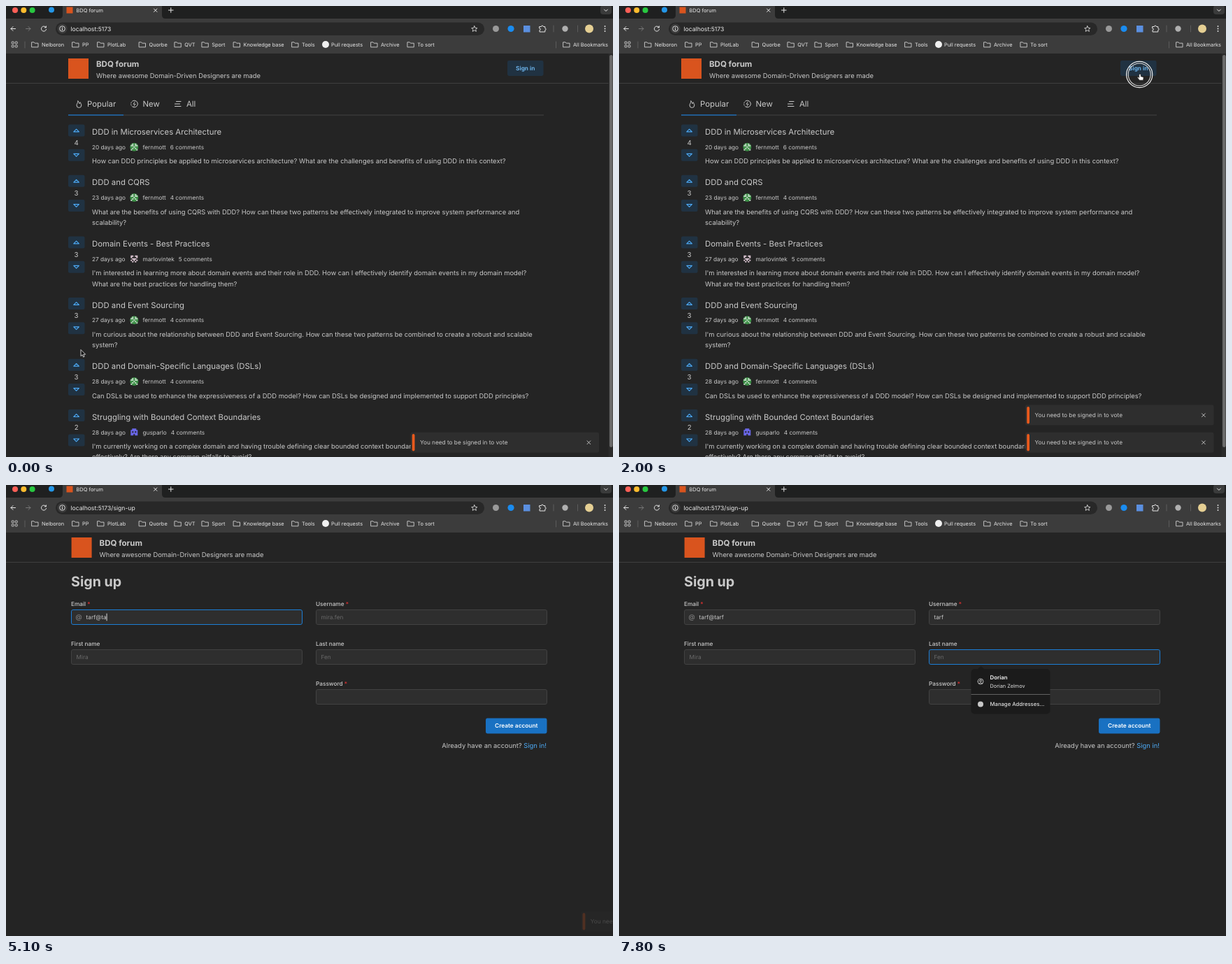
Animation of 868x645 px, one loop 8000 ms. Source, as an HTML page:

```html
<!DOCTYPE html>
<html lang="en">
<head>
<meta charset="utf-8">
<title>Forum sign-up</title>
<style>
html, body { margin: 0; width: 100%; height: 100%; overflow: hidden; background: #242424; }
svg { display: block; width: 100vw; height: 100vh; font-family: Inter, "Noto Sans", sans-serif; }
text { white-space: pre; text-rendering: geometricPrecision; }
</style>
</head>
<body>
<svg id="stage" viewBox="0 0 868 645"></svg>
<script>
const LOOP = 8000, STEP = 100;
const TEXT = '#c9c9c9', BLUE = '#4dabf7', DIM = '#696969', BAR = '#e6e6e6', PAGE = '#242424';
const BODY = 9.4, SMALL = 8.26, CHROME = 7.4;

// Markup helpers; text is placed by the middle of its capitals.
const text = (x, y, s, size = BODY, fill = TEXT, more = '') =>
  `<text x="${x}" y="${(y + size * 0.355).toFixed(2)}" font-size="${size}" fill="${fill}" ${more}>${s}</text>`;
const rect = (x, y, w, h, fill, r = 0, more = '') =>
  `<rect x="${x}" y="${y}" width="${w}" height="${h}" rx="${r}" fill="${fill}" ${more}/>`;
const dot = (x, y, r, fill, more = '') => `<circle cx="${x}" cy="${y}" r="${r}" fill="${fill}" ${more}/>`;
const line = (d, stroke = BAR, w = 1, more = '') =>
  `<path d="${d}" fill="none" stroke="${stroke}" stroke-width="${w}" stroke-linecap="round" stroke-linejoin="round" ${more}/>`;
const group = (id, body, more = '') => `<g id="${id}" ${more}>${body}</g>`;
const bold = w => `font-weight="${w}" `;
const mid = 'text-anchor="middle"';

function folder(x, label) {
  return line(`M${x} 51.8h3l1.2 1.4h4.8v5.6h-9z`, '#d0d0d0', 0.9) + text(x + 14, 55, label, CHROME, BAR);
}

function browser() {
  const lights = ['#fe5f57', '#febc2e', '#28c840'].map((c, i) => dot(13 + i * 12.3, 6, 4, c)).join('');
  const marks = [[37, 'Nelboron'], [95, 'PP'], [131, 'PlotLab'], [190.5, 'Quorbe'], [241.3, 'QVT'], [280.3, 'Sport'],
    [325.5, 'Knowledge base'], [409, 'Tools'], [522, 'Archive'], [574.3, 'To sort'], [797, 'All Bookmarks']];
  const apps = [0, 1, 2, 3].map(i =>
    rect(8.2 + (i % 2) * 5, 51 + (i >> 1) * 5, 3, 3, 'none', 0.5, 'stroke="#d0d0d0" stroke-width=".9"')).join('');
  return rect(0, 0, 868, 18, '#1f2020') + rect(0, 18, 868, 50, '#3c3c3c') +
    '<path d="M76 18q5 0 5-5V0H223v13q0 5 5 5z" fill="#3c3c3c"/>' + lights +
    dot(65, 5.5, 4, '#2497e8') + rect(86.5, 1.5, 9, 9, '#d9541e') +
    text(100.5, 6, 'BDQ forum', CHROME, BAR) +
    line('M211.5 4l4.4 4.4m0-4.4l-4.4 4.4M232.5 6h6.6m-3.3-3.3v6.6') +
    rect(850, -1, 16, 13, '#3a3b3b', 4) + line('M855.5 5l2.4 2.4l2.4-2.4') +
    line('M13.5 32.5H7m3-3l-3 3l3 3') + line('M28.5 32.5H35m-3-3l3 3l-3 3', '#777') +
    line('M57 30.4a3.6 3.6 0 1 0 .6 3M57.4 28.8v2h-2') +
    rect(71, 23.5, 613, 18.5, '#282828', 9.2) + dot(80.5, 32.5, 7, '#3c3c3c') +
    dot(80.5, 32.5, 3.8, 'none', `stroke="${BAR}" stroke-width=".9"`) + line('M80.5 32v2.4M80.5 30.5v.1') +
    text(92.5, 32.5, '', 8.6, '#ececec', 'id="url"') +
    line('M669.8 28.6l1.2 2.7l2.9 .3l-2.2 1.9l.7 2.9l-2.6-1.6l-2.6 1.6l.7-2.9l-2.2-1.9l2.9-.3z', BAR, 0.8) +
    dot(700.5, 32.5, 4.5, '#9a9a9a') + dot(722, 32.5, 4.6, '#1a8cf0') + rect(740, 28, 9.5, 9.5, '#5b8fe0') +
    line('M763 29.5h2.5a1.4 1.4 0 0 1 2.8 0h2.5v2.4a1.3 1.3 0 0 1 0 2.6v2.5h-7.8v-2.5a1.3 1.3 0 0 0 0-2.6z') +
    dot(799.5, 32.5, 4.2, '#b0b0b0') + dot(834, 32.5, 6, '#e5cf93') +
    line('M783 28v9M817.5 28v9M27 51v9M786.5 51v9', '#5c5c5c') +
    [29, 32.5, 36].map(y => dot(856.5, y, 0.9, BAR)).join('') +
    apps + dot(457, 55, 5, '#f0f0f0') + text(465, 55, 'Pull requests', CHROME, BAR) +
    marks.map(m => folder(...m)).join('');
}

function header() {
  return rect(89, 75, 29, 29, '#d9541e') + text(129, 82.5, 'BDQ forum', 11.5, TEXT, bold(700)) +
    text(129, 99.5, 'Where awesome Domain-Driven Designers are made');
}

// Mirrored pixel avatar from a small bit pattern.
function avatar(x, y, ink, base, bits) {
  let d = '';
  for (let i = 0; i < 15; i++) {
    if (!(bits >> i & 1)) continue;
    const c = i % 3, r = i / 3 | 0;
    for (const k of new Set([c, 4 - c])) d += `M${x - 5 + k * 2} ${y - 5 + r * 2}h2v2h-2z`;
  }
  return dot(x, y, 6, base) + `<path d="${d}" fill="${ink}"/>`;
}
const users = {
  fernmott: ['#b9d3bd', '#3c8f46', 0b001010100011010],
  marlovintek: ['#d9c3d0', PAGE, 0b010101110001011],
  gusparlo: ['#6a67e8', PAGE, 0b011111101111110],
};

function vote(y, up) {
  const s = up ? 1 : -1;
  return rect(89, y - 8.5, 23.5, 17, '#203242', 2) +
    line(`M96.8 ${y + 1.9 * s}L100.6 ${y - 1.9 * s}L104.4 ${y + 1.9 * s}z`, BLUE, 1.1);
}

function post(y, votes, title, days, user, comments, ...lines) {
  return vote(y - 2, true) + text(100.6, y + 15.2, votes, BODY + 0.3, TEXT, mid) + vote(y + 33.3, false) +
    text(123, y, title, 11.36) + text(123, y + 22, `${days} days ago`, SMALL) +
    avatar(183.3, y + 21.7, ...users[user]) +
    text(195.5, y + 22, `${user}<tspan dx="6">${comments} comments</tspan>`, SMALL) +
    lines.map((s, i) => text(123, y + 42 + i * 15.4, s)).join('');
}

function home() {
  const posts = [
    [180, 4, 'DDD in Microservices Architecture', 20, 'fernmott', 6,
      'How can DDD principles be applied to microservices architecture? What are the challenges and benefits of using DDD in this context?'],
    [252.2, 3, 'DDD and CQRS', 23, 'fernmott', 4,
      'What are the benefits of using CQRS with DDD? How can these two patterns be effectively integrated to improve system performance and',
      'scalability?'],
    [340, 3, 'Domain Events - Best Practices', 27, 'marlovintek', 5,
      "I'm interested in learning more about domain events and their role in DDD. How can I effectively identify domain events in my domain model?",
      'What are the best practices for handling them?'],
    [427.5, 3, 'DDD and Event Sourcing', 27, 'fernmott', 4,
      "I'm curious about the relationship between DDD and Event Sourcing. How can these two patterns be combined to create a robust and scalable",
      'system?'],
    [515.2, 3, 'DDD and Domain-Specific Languages (DSLs)', 28, 'fernmott', 4,
      'Can DSLs be used to enhance the expressiveness of a DDD model? How can DSLs be designed and implemented to support DDD principles?'],
    [587.6, 2, 'Struggling with Bounded Context Boundaries', 28, 'gusparlo', 4,
      "I'm currently working on a complex domain and having trouble defining clear bounded context boundaries. How can I define them",
      'effectively? Are there any common pitfalls to avoid?'],
  ];
  return rect(717, 78, 51.5, 22, '#203242', 2.4) + text(742.7, 89, 'Sign in', 8.3, '#74c0fc', bold(600) + mid) +
    line('M103 136c0 3-2 3.5-2 6a3.4 3.4 0 0 0 6.8 0c0-2-1.2-2.6-1.4-4.3c-.8 .5-1.2 1.2-1.3 2c-1-1-.3-3-2.1-3.7z', TEXT) +
    text(116, 140, 'Popular', 11.4) +
    dot(183.5, 140, 4.8, 'none', `stroke="${TEXT}" stroke-dasharray="11 1.2 2 1.2 2 1.2"`) +
    line('M184.3 137l-2.2 3.3h3l-2.2 3', TEXT, 0.9) + text(195.5, 140, 'New', 11.4) +
    line('M243.5 136.5h6.5M241.5 140h7M241.5 143.5h8.5', TEXT, 1.1) + text(258, 140, 'All', 11.4) +
    rect(89, 155.5, 680, 1, '#424242') + rect(89, 155.3, 79, 1.3, '#1971c2') +
    posts.map(p => post(...p)).join('') +
    rect(861.5, 68, 6.5, 577, '#2b2b2b') + rect(863, 70, 4.6, 561, '#6b6b6b', 2.3);
}

// A labelled input whose placeholder, value and caret can be changed later.
function field(id, x, y, w, label, hint, pad = 7.5) {
  const req = label.endsWith('*') ? `${label.slice(0, -1)}<tspan fill="#e03131">*</tspan>` : label;
  return text(x, y - 18.5, req, SMALL, TEXT, bold(500)) +
    rect(x + 0.5, y - 10.5, w - 1, 21, '#2e2e2e', 2.4, `id="${id}Box" stroke="#424242"`) +
    text(x + pad, y, hint, SMALL, DIM, `id="${id}Hint"`) +
    text(x + pad, y, '', SMALL, TEXT, `id="${id}Text"`) +
    rect(x + pad, y - 5.3, 0.9, 10.6, '#ececec', 0, `id="${id}Caret"`);
}
function button(x, y, w, label) {
  return rect(x, y - 11, w, 22, '#1971c2', 2.4) + text(x + w / 2, y, label, 8.3, '#fff', bold(600) + mid);
}
const ask = (x, y, s, link) => text(x, y, `${s} <tspan fill="${BLUE}">${link}</tspan>`, BODY, TEXT, 'text-anchor="end"');

function login() {
  return text(280, 138, 'Sign in', 19.7, TEXT, bold(700)) +
    field('user', 280, 189, 307, 'Username *', 'mira.fen') + field('pass', 280, 246, 307, 'Password *', '') +
    button(535, 287.5, 52, 'Sign in') + ask(586.5, 316, "Don't have an account?", 'Sign up!');
}
function register() {
  return text(93, 138, 'Sign up', 19.7, TEXT, bold(700)) +
    field('email', 93, 189, 331, 'Email *', 'mira.fen@example.com', 21.6) + text(104, 188.3, '@', 9.5, '#8a8a8a', mid) +
    field('nick', 443, 189, 331, 'Username *', 'mira.fen') + field('first', 93, 246, 331, 'First name', 'Mira') +
    field('last', 443, 246, 331, 'Last name', 'Fen') + field('secret', 443, 303, 331, 'Password *', '') +
    button(686, 344.5, 87.5, 'Create account') + ask(773, 373, 'Already have an account?', 'Sign in!');
}

function popup(id, x, y, w, title, icon) {
  return group(id, rect(0, 0, w, 64.5, '#1b1b1b', 5) + '<path d="M9 .5l5-4.5l5 4.5z" fill="#1b1b1b"/>' +
    line(icon, '#c8c8c8', 0.9) + text(27, 12, title, 7.9, '#f0f0f0', bold(600)) +
    text(27, 24.3, 'Dorian Zelmov', 7.3, '#e0e0e0') + rect(0, 36, w, 0.9, '#6a6a6a') +
    dot(13.5, 50.6, 4, '#c8c8c8') + text(27, 50.6, 'Manage Addresses...', 7.7, '#e0e0e0', bold(500)),
    `transform="translate(${x} ${y})"`);
}
const envelope = 'M9.7 15h7.6v6h-7.6zl3.8 3.2l3.8-3.2';
const person = 'M9.7 18a3.9 3.9 0 1 0 7.8 0a3.9 3.9 0 1 0-7.8 0M12.2 17a1.4 1.4 0 1 0 2.8 0a1.4 1.4 0 1 0-2.8 0M11 20.7q2.6-2 5.2 0';

const tip = group('tip', rect(547.5, 205.5, 122, 25, '#2b2b2b', 2.5, 'stroke="#555" stroke-width=".8"') +
  '<path d="M554 205.5l5-4.5l5 4.5z" fill="#444"/>' + rect(553, 210.5, 14, 14, '#e8591c', 2) +
  text(560, 217.5, '!', 10, '#fff', bold(700) + mid) + text(572, 217.7, 'Please fill out this field.', SMALL, '#d8d8d8'));

const toast = id => group(id, rect(0, 0, 269.5, 29, '#2e2e2e', 2.4) + rect(2.2, 2.4, 3.8, 24.4, '#e8591c', 1.9) +
  text(13.5, 14.4, 'You need to be signed in to vote', SMALL) +
  line('M252.5 12.2l4.8 4.8m0-4.8l-4.8 4.8', TEXT, 0.9));

const pointer = group('arrow', '<path d="M0 0v9.2l2.1-1.9l1.5 3.3l1.5-.7l-1.4-3.2h2.9z" fill="#111" stroke="#f2f2f2" stroke-width=".8"/>') +
  group('hand', '<path d="M-1.3-2.5q.2-1.2 1.3-1.2t1.2 1.2v2.2l3 .7q1 .3 .9 1.4l-.5 3.4h-5.3l-2.7-3.5q-.5-.9 .3-1.2t1.8 1z" fill="#fff" stroke="#222" stroke-width=".7"/>') +
  group('beam', line('M-1.6-5q1.6 0 1.6 1v8q0 1-1.6 1M1.6-5q-1.6 0-1.6 1m0 8q0 1 1.6 1', '#f2f2f2', 1));

document.getElementById('stage').innerHTML =
  rect(0, 0, 868, 645, PAGE) + rect(0, 110, 868, 0.9, '#424242') +
  group('header', header()) + group('home', home()) + group('login', login()) + group('register', register()) +
  popup('mailPop', 153.5, 206, 128, 'zelmo.kor@example.com', envelope) +
  popup('firstPop', 153.5, 263, 113, 'Dorian', person) + popup('lastPop', 503.5, 263, 113, 'Dorian', person) + tip +
  toast('old') + toast('fresh') + browser() +
  group('ring', dot(0, 0, 18.6, 'none', 'stroke="#f0f0f0" stroke-width="1.2"') +
    dot(0, 0, 16, 'none', 'stroke="#d8d8d8" stroke-width="1.1"')) + group('pointer', pointer);

const el = id => document.getElementById(id);
const show = (id, on) => el(id).setAttribute('display', on ? 'inline' : 'none');
const move = (id, x, y) => el(id).setAttribute('transform', `translate(${x.toFixed(2)} ${y.toFixed(2)})`);
const within = (t, ...spans) => spans.some(([a, b]) => t >= a && t < b);

const route = [[0, 107, 491.5], [400, 101, 512], [900, 101, 512], [1700, 745, 101], [2100, 745, 101], [2700, 565, 323],
  [3000, 565, 323], [3400, 262, 190], [3500, 262, 190], [3700, 277, 134.5]];
function cursorAt(t) {
  const i = route.findIndex(k => k[0] > t);
  if (i < 0) return route.at(-1).slice(1);
  const [t0, x0, y0] = route[i - 1], [t1, x1, y1] = route[i];
  const p = (t - t0) / (t1 - t0), e = p * p * (3 - 2 * p);
  return [x0 + (x1 - x0) * e, y0 + (y1 - y0) * e];
}

const word = 'tarf@tarf';
const mailKeys = [3900, 4000, 4100, 4300, 4700, 4900, 5100, 5200, 5400];
const nickKeys = [6200, 6500, 6600, 6700];
const typed = (t, keys) => word.slice(0, keys.filter(k => k <= t).length);

function setField(id, value, focus, caret = focus) {
  const label = el(id + 'Text');
  label.textContent = value;
  show(id + 'Hint', !value);
  el(id + 'Box').setAttribute('stroke', focus ? '#1c7ed6' : '#424242');
  show(id + 'Caret', caret);
  if (caret) el(id + 'Caret').setAttribute('x', +label.getAttribute('x') + (value ? label.getComputedTextLength() : 0));
}

function update(t) {
  const isHome = t < 2200, isLogin = within(t, [2200, 2900]);
  show('home', isHome);
  show('login', isLogin);
  show('register', t >= 2900);
  move('header', isHome ? 0 : 4.6, 0);
  el('url').textContent = 'localhost:5173' + (isHome ? '' : isLogin ? '/sign-in' : '/sign-up');

  // Toasts overshoot on arrival, stack upwards and leave to the right.
  const left = isHome ? 581 : 590;
  show('old', t < 4000);
  move('old', left - (t < 100 ? 2.5 : 0), t < 1000 ? 609.7 : 570.6);
  const out = Math.min(1, Math.max(0, (t - 5000) / 116));
  show('fresh', t >= 1000 && out < 1);
  move('fresh', left - (t < 1100 ? 2.5 : 0) + 269.5 * out, 609.7);
  el('fresh').setAttribute('opacity', 1 - out * 0.9);

  for (const id of ['user', 'pass', 'secret']) setField(id, '', false);
  setField('email', typed(t, mailKeys), within(t, [3400, 5700]));
  setField('nick', typed(t, nickKeys), within(t, [5700, 6900]));
  setField('first', '', within(t, [6900, 7300]));
  setField('last', '', t >= 7300, within(t, [7300, 7800]));
  show('mailPop', within(t, [3600, 3900]));
  show('firstPop', within(t, [7000, 7300]));
  show('lastPop', t >= 7500);
  show('tip', within(t, [5700, 6400]));
  el('tip').setAttribute('opacity', t < 6200 ? 1 : 1 - (t - 6100) / 300);

  const [x, y] = cursorAt(t);
  const hand = within(t, [300, 1000], [1600, 2300], [2600, 2900]), beam = within(t, [3300, 3600]);
  show('pointer', t < 3900);
  move('pointer', x, y);
  show('hand', hand);
  show('beam', beam);
  show('arrow', !hand && !beam);
  show('ring', within(t, [800, 1000], [2000, 2200], [2800, 2900], [3400, 3600]));
  move('ring', x - 0.8, y - 3);
}

const start = performance.now();
function tick(now) {
  const t = Math.max(0, now - start) % LOOP;
  update(Math.floor(t / STEP) * STEP);
  requestAnimationFrame(tick);
}
update(0);
requestAnimationFrame(tick);
</script>
</body>
</html>
```
